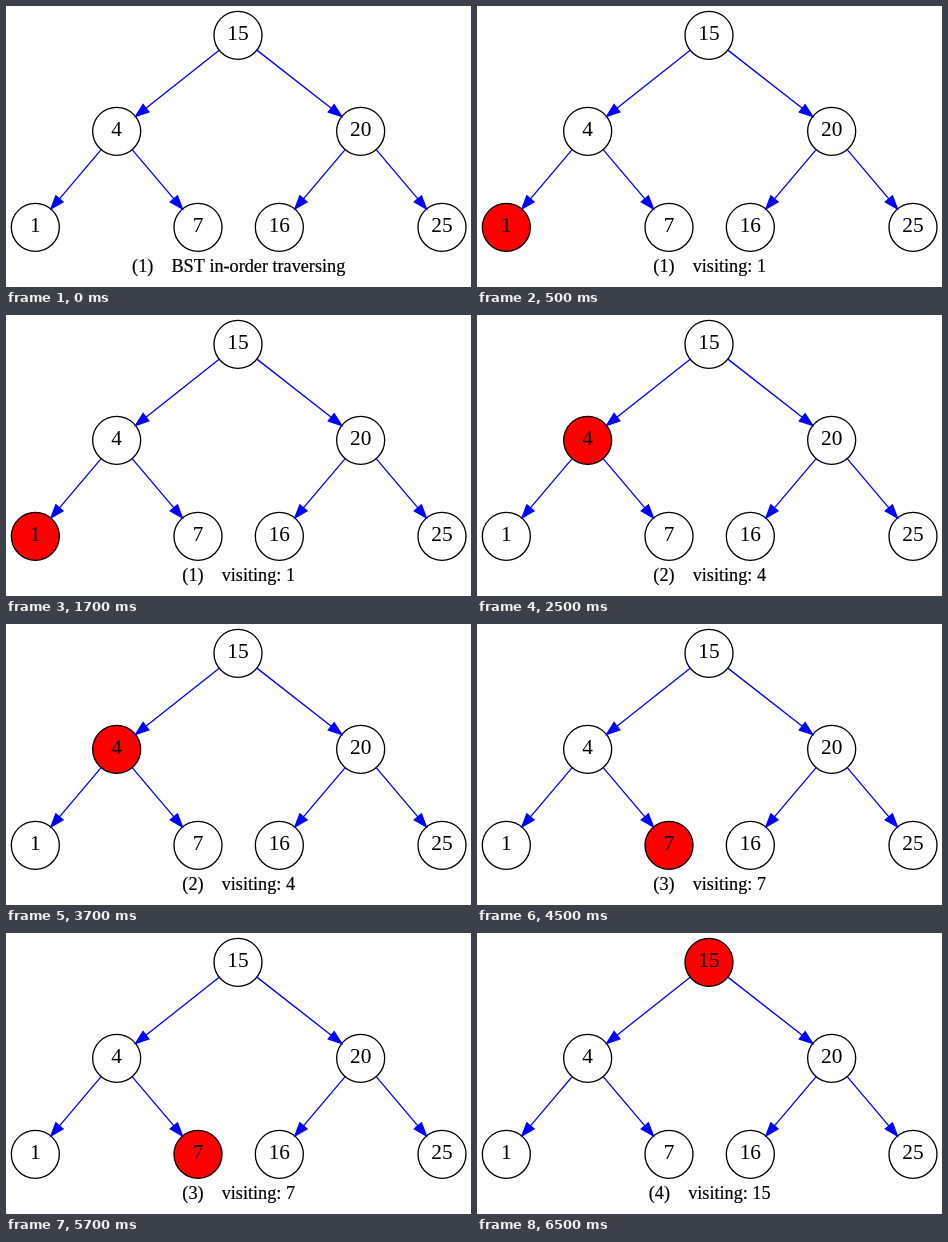
An HTML page that plays this animation: 465x281 px, repeating every 8000 ms.

```html
<!DOCTYPE html>
<html lang="en">
<head>
<meta charset="utf-8">
<title>BST in-order traversing</title>
<style>
  html, body { margin: 0; width: 100%; height: 100%; overflow: hidden; background: #fff; }
  svg { display: block; }
  text { font-family: "Liberation Serif", "Times New Roman", serif; font-kerning: none; text-anchor: middle; white-space: pre; }
  .label { font-size: 21.33px; }
  .caption { font-size: 18.2px; stroke: #000; stroke-width: 0.2; }
  circle { stroke: #000; stroke-width: 1.33; }
  .edge { stroke: #00f; fill: #00f; stroke-width: 1.33; }
</style>
</head>
<body>
<svg id="stage" width="465" height="281" viewBox="0 0 465 281"></svg>
<script>
const stage = document.getElementById("stage");
const R = 24, HEAD = 13.33, HALF = 4.67, LOOP = 8000;

// In-order keys with x and depth; layout units are points at 96 dpi.
const px = pt => (pt + 4) * 4 / 3;
const place = (key, x, depth) => ({ key, x: px(x), y: px(18 + 72 * depth) });
const nodes = [
  place(1, 18, 2), place(4, 79, 1), place(7, 140, 2), place(15, 170, 0),
  place(16, 201, 2), place(20, 262, 1), place(25, 323, 2)
];
const edges = [[3, 1], [3, 5], [1, 0], [1, 2], [5, 4], [5, 6]];

function add(tag, attrs, content = "") {
  const el = document.createElementNS("http://www.w3.org/2000/svg", tag);
  for (const name in attrs) el.setAttribute(name, attrs[name]);
  el.textContent = content;
  return stage.appendChild(el);
}

for (const node of nodes) {
  node.circle = add("circle", { cx: node.x, cy: node.y, r: R, fill: "#fff" });
  add("text", { class: "label", x: node.x, y: node.y + 4.67 }, node.key);
}

for (const [from, to] of edges) {
  const a = nodes[from], b = nodes[to];
  const length = Math.hypot(b.x - a.x, b.y - a.y);
  const ux = (b.x - a.x) / length, uy = (b.y - a.y) / length;
  const at = (along, side = 0) =>
    `${a.x + ux * along - uy * side} ${a.y + uy * along + ux * side}`;
  const tip = length - R, base = tip - HEAD;
  add("path", {
    class: "edge",
    d: `M${at(R)}L${at(base)}M${at(base, HALF)}L${at(tip)}L${at(base, -HALF)}Z`
  });
}

const caption = add("text", { class: "caption", x: 232.67, y: 266 });
const start = performance.now();
let shown;

function draw(now) {
  const t = Math.max(0, now - start) % LOOP;
  const visit = Math.floor((t - 500) / 2000);
  if (visit !== shown) {
    shown = visit;
    nodes.forEach((node, i) => node.circle.setAttribute("fill", i === visit ? "#f00" : "#fff"));
    const action = visit < 0 ? "BST in-order traversing" : `visiting: ${nodes[visit].key}`;
    caption.textContent = `(${Math.max(visit, 0) + 1})${"\u00a0".repeat(4)}${action}`;
  }
  requestAnimationFrame(draw);
}
draw(start);
</script>
</body>
</html>
```
